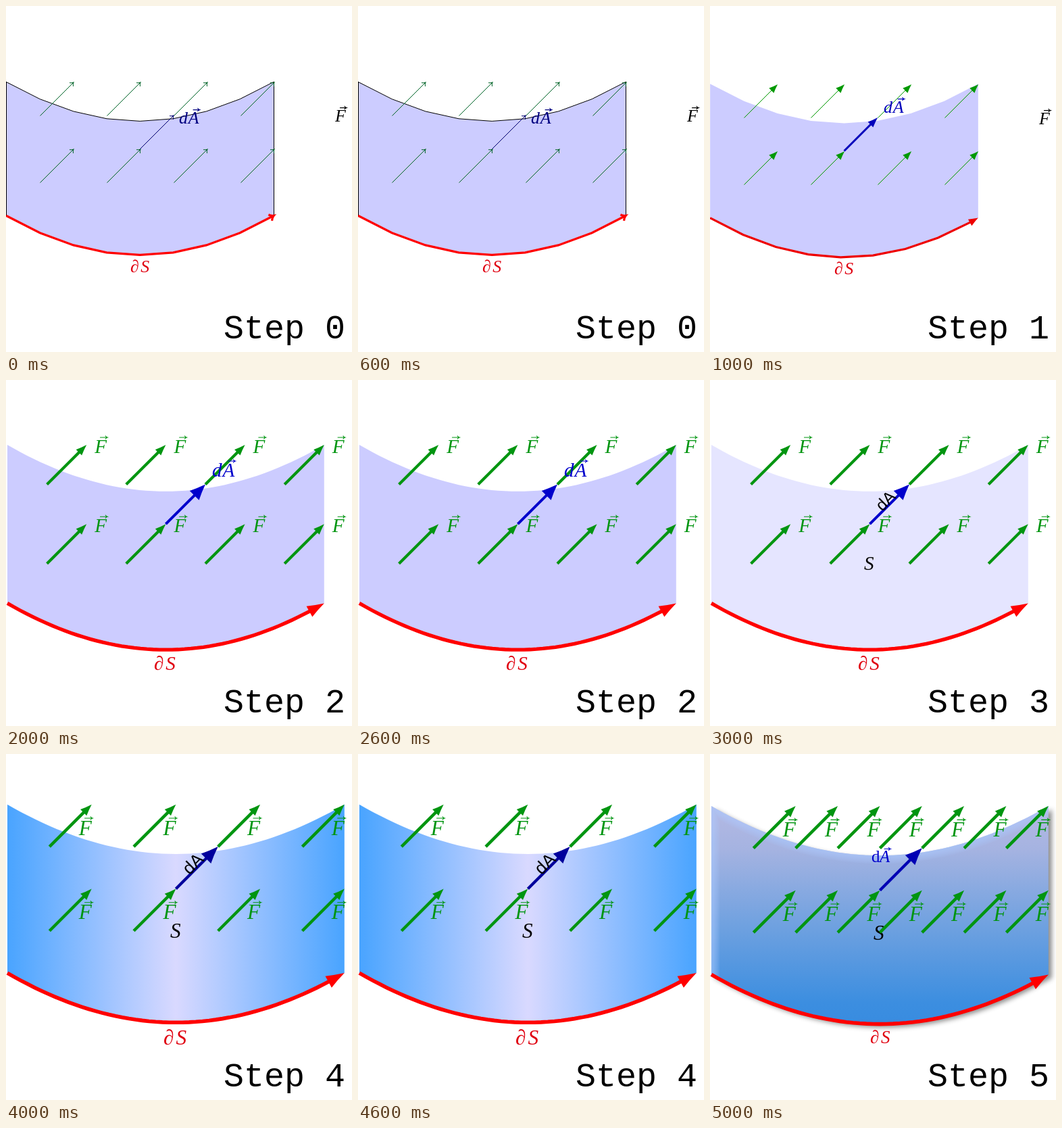
Animation of 512x512 px, one loop 6000 ms. Source, as an HTML page with a canvas:

```html
<!DOCTYPE html>
<html lang="en">
<head>
<meta charset="utf-8">
<title>Surface drawing in steps</title>
<style>
  html, body { margin: 0; width: 100%; height: 100%; overflow: hidden; background: #fff; }
  canvas { display: block; width: 512px; height: 512px; }
</style>
</head>
<body>
<canvas id="stage" width="512" height="512"></canvas>
<script>
const ctx = document.getElementById('stage').getContext('2d');
const STEP_MS = 1000;
const GREEN = '#009510', RED = '#ff0000', BLUE = '#0000cc';
const SERIF = '"Liberation Serif", serif';

// Each step: u is the grid unit, (x, y) the top left corner of the surface.
const base = { x: 2, y: 96, u: 58.6, smooth: 48, gap: 2, cols: 4, fill: '#ccccff',
  field: { color: GREEN, width: 4.2, len: 16, wide: 12 },
  area: { color: BLUE, width: 4, len: 23, wide: 19.5 },
  edge: { color: RED, width: 5.3, len: 25, wide: 18 },
  em: 27, tagDx: 12, tagDy: 12 };

const large = { ...base, y: 74.7, u: 62.35, em: 29, tagDx: -19, tagDy: 45,
  field: { color: GREEN, width: 4.5, len: 17, wide: 13 },
  area: { color: '#00009c', width: 4.3, len: 25, wide: 20.5 },
  edge: { color: RED, width: 5.6, len: 27, wide: 19.5 } };

const steps = [
  { ...base, x: 0.2, y: 112.3, u: 49.5, smooth: 8, outline: true, em: 24,
    field: { color: '#006428', width: 1, open: 6 },
    area: { color: '#000070', width: 1, open: 6 },
    edge: { color: RED, width: 3.2, open: 8 },
    labels() {
      areaTag(256, 174, '#000080');
      vecTag('F', 487, 171, '#000');
      edgeTag(184, 394);
    } },
  { ...base, x: 0.2, y: 115.3, u: 49.58, smooth: 8, em: 24,
    field: { color: '#009900', width: 1, len: 13, wide: 10 },
    area: { color: '#0000bb', width: 3, len: 15, wide: 11 },
    edge: { color: '#ee0000', width: 3.2, len: 14, wide: 11 },
    labels() {
      areaTag(257, 158, '#0000bb');
      vecTag('F', 487, 175, '#000');
      edgeTag(184, 397);
    } },
  { ...base, tags: true,
    labels() {
      areaTag(305, 143, BLUE);
      edgeTag(219, 429);
    } },
  { ...base, tags: true, fill: '#e5e5ff',
    labels() {
      slopedTag(259.5, 178.5, 24.5);
      glyph('S', 228, 281, '#000');
      edgeTag(219, 429);
    } },
  { ...large, tags: true, fill: sideShade,
    labels() {
      slopedTag(276.3, 162, 26);
      glyph('S', 243, 272, '#000');
      edgeTag(233, 430);
    } },
  { ...large, y: 77, tags: true, gap: 1, cols: 7, fill: downShade, relief: true,
    area: { ...large.area, color: '#0000b4' },
    under() { glyph('S', 242, 275, '#000'); },
    labels() {
      em = 23;
      glyph('d', 239, 160, BLUE, 'normal');
      vecTag('A', 251, 160, BLUE);
      em = 25;
      edgeTag(237, 428);
    } }
];

let em = 24;

function sideShade(s) {
  const g = ctx.createLinearGradient(s.x, 0, s.x + 8 * s.u, 0);
  g.addColorStop(0, '#49a4ff');
  g.addColorStop(0.5, '#d9d9ff');
  g.addColorStop(1, '#49a4ff');
  return g;
}

function downShade(s) {
  const g = ctx.createLinearGradient(0, s.y, 0, s.y + 5.17 * s.u);
  g.addColorStop(0, '#b4b9e3');
  g.addColorStop(0.2, '#a5b3e1');
  g.addColorStop(0.55, '#6fa1e0');
  g.addColorStop(0.9, '#3c8ee0');
  g.addColorStop(1, '#388ce0');
  return g;
}

// Point on a cubic that leaves and meets its chord at 30 degrees.
function sag(s, y, t) {
  const w = 8 * s.u, r = 1 - t, reach = 0.339 * w;
  return [
    s.x + 3 * r * r * t * reach + 3 * r * t * t * (w - reach) + t * t * t * w,
    y + 3 * r * t * 0.1957 * w
  ];
}

function curve(s, y, from = 0, to = 1) {
  for (let i = 0; i <= s.smooth; i++) ctx.lineTo(...sag(s, y, from + (to - from) * i / s.smooth));
}

function surfacePath(s) {
  ctx.beginPath();
  curve(s, s.y);
  curve(s, s.y + 4 * s.u, 1, 0);
  ctx.closePath();
}

function surface(s) {
  ctx.save();
  ctx.fillStyle = typeof s.fill === 'function' ? s.fill(s) : s.fill;
  surfacePath(s);
  if (s.relief) {
    ctx.shadowColor = 'rgba(0,0,0,0.45)';
    ctx.shadowBlur = 7;
    ctx.shadowOffsetX = ctx.shadowOffsetY = 5;
  }
  ctx.fill();
  ctx.restore();
  if (s.relief) softRim(s);
  if (s.outline) {
    ctx.strokeStyle = '#000';
    ctx.lineWidth = 1;
    ctx.beginPath();
    ctx.moveTo(0.5, s.y + 4 * s.u);
    ctx.lineTo(0.5, s.y);
    curve(s, s.y);
    ctx.moveTo(396.5, s.y);
    ctx.lineTo(396.5, s.y + 4 * s.u);
    ctx.stroke();
  }
}

function softRim(s) {
  ctx.save();
  surfacePath(s);
  ctx.clip();
  ctx.strokeStyle = 'rgba(170,200,255,0.13)';
  for (let w = 4; w <= 24; w += 4) {
    ctx.lineWidth = w;
    ctx.beginPath();
    ctx.moveTo(s.x, s.y + 5 * s.u);
    ctx.lineTo(s.x, s.y);
    curve(s, s.y);
    ctx.stroke();
  }
  ctx.restore();
}

function head(x, y, angle, pen) {
  ctx.save();
  ctx.translate(x, y);
  ctx.rotate(angle);
  ctx.beginPath();
  if (pen.open) {
    const b = pen.open;
    ctx.lineWidth = pen.width;
    ctx.moveTo(-b * 0.75, -b * 0.65);
    ctx.quadraticCurveTo(-b * 0.4, -b * 0.15, 0, 0);
    ctx.quadraticCurveTo(-b * 0.4, b * 0.15, -b * 0.75, b * 0.65);
    ctx.stroke();
  } else {
    const { len, wide } = pen;
    ctx.moveTo(0, 0);
    ctx.quadraticCurveTo(-len * 0.55, -wide * 0.23, -len, -wide / 2);
    ctx.lineTo(-len, wide / 2);
    ctx.quadraticCurveTo(-len * 0.55, wide * 0.23, 0, 0);
    ctx.fill();
  }
  ctx.restore();
}

function usePen(pen) {
  ctx.strokeStyle = ctx.fillStyle = pen.color;
  ctx.lineWidth = pen.width;
}

// Diagonal arrow one grid unit right and up; hairlines sit on pixel centres.
function arrow(x, y, u, pen) {
  if (pen.width === 1) {
    x = Math.round(x) + 0.5;
    y = Math.round(y) + 0.5;
  }
  const cut = (pen.len || 0) * 0.64;
  usePen(pen);
  ctx.beginPath();
  ctx.moveTo(x, y);
  ctx.lineTo(x + u - cut, y - u + cut);
  ctx.stroke();
  head(x + u, y - u, -Math.PI / 4, pen);
}

function boundary(s) {
  const y = s.y + 4 * s.u, end = 1 - (s.edge.len || 0) * 0.85 / (9 * s.u);
  const [tx, ty] = sag(s, y, 1), [px, py] = sag(s, y, Math.min(end, 0.97));
  usePen(s.edge);
  ctx.beginPath();
  curve(s, y, 0, end);
  ctx.stroke();
  head(tx, ty, Math.atan2(ty - py, tx - px), s.edge);
}

function glyph(ch, x, y, color, style = 'italic') {
  ctx.font = `${style} ${em * 1.08}px ${SERIF}`;
  ctx.fillStyle = color;
  ctx.fillText(ch, x, y);
}

function vecTag(ch, x, y, color) {
  glyph(ch, x, y, color);
  const top = y - em * 0.85, left = x + em * 0.29, right = x + em * 0.7;
  ctx.strokeStyle = color;
  ctx.lineWidth = 1.1;
  ctx.beginPath();
  ctx.moveTo(left, top);
  ctx.lineTo(right, top);
  ctx.moveTo(right - 3, top - 2.5);
  ctx.quadraticCurveTo(right - 2, top - 0.5, right, top);
  ctx.quadraticCurveTo(right - 2, top + 0.5, right - 3, top + 2.5);
  ctx.stroke();
}

function areaTag(x, y, color) {
  glyph('d', x, y, color);
  vecTag('A', x + em * 0.57, y, color);
}

function edgeTag(x, y) {
  glyph('∂', x, y, '#e00010');
  glyph('S', x + em * 0.64, y, '#e00010');
}

function slopedTag(x, y, size) {
  ctx.save();
  ctx.translate(x, y);
  ctx.rotate(-Math.PI / 4);
  ctx.font = `${size}px "Liberation Sans", sans-serif`;
  ctx.textAlign = 'center';
  ctx.fillStyle = '#000';
  ctx.fillText('dA', 0, size * 0.35);
  ctx.restore();
}

function field(s) {
  for (let row = 0; row < 2; row++) {
    for (let col = 0; col < s.cols; col++) {
      const x = s.x + (1 + col * s.gap) * s.u, y = s.y + (1 + row * 2) * s.u;
      arrow(x, y, s.u, s.field);
      if (s.tags) vecTag('F', x + s.u + s.tagDx, y - s.u + s.tagDy, GREEN);
    }
  }
}

function draw(index) {
  const s = steps[index];
  em = s.em;
  ctx.fillStyle = '#fff';
  ctx.fillRect(0, 0, 512, 512);
  surface(s);
  if (s.under) s.under();
  boundary(s);
  field(s);
  arrow(s.x + 4 * s.u, s.y + 2 * s.u, s.u, s.area);
  s.labels();
  ctx.font = '50px "Liberation Mono", monospace';
  ctx.fillStyle = '#000';
  ctx.fillText('Step ' + index, 322, 492);
}

const start = performance.now();
function tick() {
  const time = performance.now() - start;
  draw(Math.floor(time / STEP_MS) % steps.length);
  requestAnimationFrame(tick);
}
tick();
</script>
</body>
</html>
```
